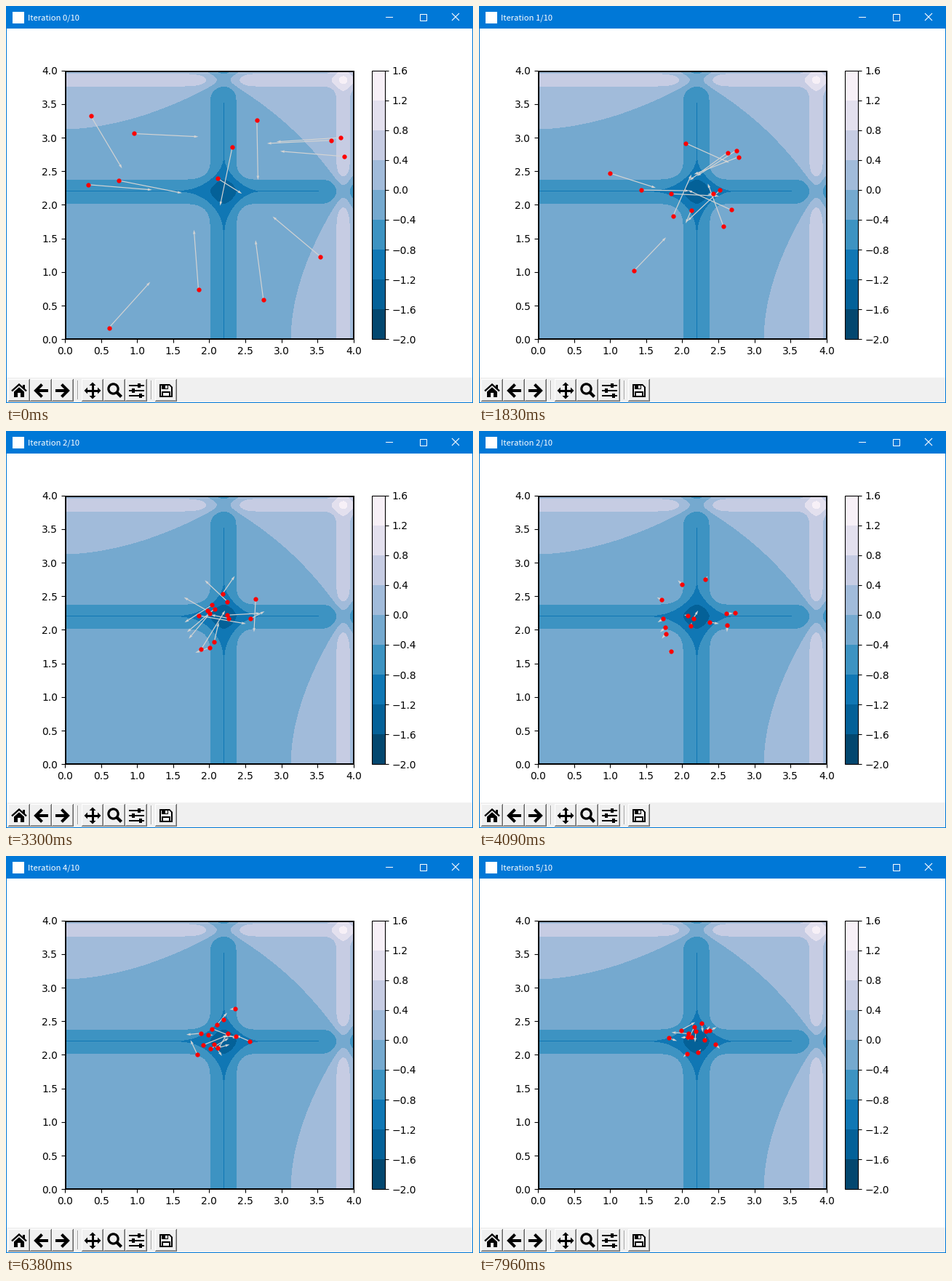
These frames come from a looping animation (642 by 546 pixels, 8 s). A matplotlib script:

```python
import numpy as np
import matplotlib.pyplot as plt
from matplotlib.animation import FuncAnimation
from matplotlib.patches import Circle, Polygon, Rectangle

W, H, DPI = 642, 546, 100
PT = 72 / DPI          # one pixel in points
FRAMES, INTERVAL = 200, 40
STEPS, PER_TURN = 112, 20   # swarm steps per loop and per iteration

fig = plt.figure(figsize=(W / DPI, H / DPI), dpi=DPI, facecolor="white")


def pixel_axes(x, y, w, h):
    return fig.add_axes([x / W, 1 - (y + h) / H, w / W, h / H])


# ---- objective function ----
def valley(v):
    return -np.sin(v) * np.sin(v**2 / np.pi) ** 20


grid = np.linspace(0, 4, 401)
ax = pixel_axes(81, 88.62, 396.8, 369.6)
levels = np.linspace(-2, 1.6, 10)
field = ax.contourf(grid, grid, valley(grid)[None, :] + valley(grid)[:, None],
                    levels=levels, cmap="PuBu_r")
ax.set_xticks(np.arange(0, 4.1, 0.5))
ax.set_yticks(np.arange(0, 4.1, 0.5))
ax.spines[:].set_visible(False)
fig.colorbar(field, cax=pixel_axes(502.6, 88.62, 18.48, 369.6), ticks=levels)

# ---- window ----
stage = fig.add_axes([0, 0, 1, 1], zorder=5)
stage.set_xlim(0, W)
stage.set_ylim(H, 0)
stage.axis("off")


def box(x, y, w, h, color):
    stage.add_patch(Rectangle((x, y), w, h, fc=color, lw=0))


def frame(x, y, w, h, width, color):
    stage.add_patch(Rectangle((x, y), w, h, fill=False, ec=color, lw=width * PT))


def shape(*points, color="black"):
    stage.add_patch(Polygon(points, fc=color, lw=0))


def stroke(points, width, color="black"):
    x, y = zip(*points)
    stage.plot(x, y, color=color, lw=width * PT, solid_capstyle="butt",
               solid_joinstyle="miter")


BLUE, FACE = "#0078d7", "#f0f0f0"
frame(82, 90, 396, 368, 2, "black")
box(0, 511, W, 35, FACE)
box(0, 0, W, 31, BLUE)
box(0, 0, 1, H, BLUE)
box(W - 1, 0, 1, H, BLUE)
box(0, H - 1, W, 1, BLUE)
box(9, 8, 16, 16, "white")

# minimise, maximise, close
left, gap = 522, 46
box(left, 15, 10, 1, "white")
frame(left + gap + 0.5, 10.5, 9, 9, 1, "white")
for y0, y1 in ((10, 20), (20, 10)):
    stroke([(left + 2 * gap - 1, y0), (left + 2 * gap + 9, y1)], 1.1, "white")
title = stage.text(30, 20, "", color="white", fontsize=11.2 * PT,
                   family="Noto Sans CJK JP", va="baseline")


# ---- toolbar ----
def button(x):
    box(x, 513, 30, 31, "#696969")
    box(x, 513, 29, 30, "white")
    box(x + 1, 514, 28, 29, "#a0a0a0")
    box(x + 1, 514, 27, 28, FACE)


for x in (3, 33, 63, 104, 134, 164, 205):
    button(x)
for x in (98, 199):
    box(x, 515, 1, 26, "#a0a0a0")
    box(x + 1, 515, 1, 26, "white")

# home
stroke([(8, 529.5), (18, 520.5), (28, 529.5)], 2.3)
box(23, 521, 2.6, 5, "black")
shape((11, 530.5), (18, 524.3), (25, 530.5), (25, 538), (20, 538),
      (20, 532), (16, 532), (16, 538), (11, 538))
# back and forward
for cx, d in ((48, 1), (78, -1)):
    stroke([(cx + 1.5 * d, 520.5), (cx - 7 * d, 529), (cx + 1.5 * d, 537.5)], 4)
    stroke([(cx - 6 * d, 529), (cx + 10 * d, 529)], 4)
# pan
stroke([(111, 529), (127, 529)], 3)
stroke([(119, 521), (119, 537)], 3)
for dx, dy in ((1, 0), (-1, 0), (0, 1), (0, -1)):
    bx, by = 119 + 7 * dx, 529 + 7 * dy
    shape((bx + 4.5 * dx, by + 4.5 * dy), (bx + 4.5 * dy, by + 4.5 * dx),
          (bx - 4.5 * dy, by - 4.5 * dx))
# zoom
stage.add_patch(Circle((147.5, 526.5), 6.6, fill=False, ec="black", lw=3.2 * PT))
stroke([(152, 531), (158.5, 537.5)], 4.2)
# sliders
for y, knob in ((522, 181), (529, 173), (536, 183)):
    box(169, y - 1, 21, 2, "black")
    box(knob, y - 3, 4, 6, "black")
# save
shape((211, 520), (225, 520), (229, 524), (229, 538), (211, 538))
shape((213, 522), (224.5, 522), (227, 524.5), (227, 536), (213, 536), color=FACE)
box(214, 520, 9, 7, "black")
box(219, 522, 2.5, 4, FACE)
box(214, 530, 12, 7, "black")
box(216, 532, 8, 4, FACE)

# ---- particle swarm ----
BEST = np.array([2.15, 2.25])
TOP_SPEED, INERTIA = 0.89, 0.6

# x, y and first heading in degrees
SEEDS = np.array([
    (0.36, 3.32, -61), (0.96, 3.06, -3), (0.32, 2.30, -5), (0.75, 2.36, -12),
    (0.61, 0.17, 50), (1.85, 0.74, 94), (2.75, 0.59, 97), (3.54, 1.23, 138),
    (3.87, 2.72, 175), (3.69, 2.96, 183), (3.82, 3.00, 184), (2.66, 3.26, -89),
    (2.32, 2.86, -101), (2.12, 2.39, -34)])


def limit(v):
    speed = np.linalg.norm(v, axis=1, keepdims=True)
    return v * np.minimum(1, TOP_SPEED / speed)


def fly(turns):
    rng = np.random.default_rng(4)
    pos, angle = SEEDS[:, :2], np.radians(SEEDS[:, 2])
    reach = 2.8 * np.linalg.norm(BEST - pos, axis=1)
    vel = limit(reach[:, None] * np.column_stack([np.cos(angle), np.sin(angle)]))
    stops = [pos]
    for _ in range(turns):
        pos = pos + vel
        stops.append(pos)
        pull = rng.uniform(0.5, 1.5, pos.shape) * (BEST - pos)
        vel = limit(INERTIA * vel + pull)
    return stops


stops = fly(STEPS // PER_TURN + 1)
arrows = ax.quiver(*stops[0].T, *(stops[1] - stops[0]).T, color="lightgray",
                   angles="xy", scale_units="xy", scale=1, units="dots",
                   width=1.2, zorder=3)
dots, = ax.plot([], [], "ro", ms=3, mew=1.5, zorder=4)
ax.set_xlim(0, 4)
ax.set_ylim(0, 4)


def update(i):
    turn, part = divmod(i * STEPS // FRAMES, PER_TURN)
    goal = stops[turn + 1]
    here = stops[turn] + (goal - stops[turn]) * part / PER_TURN
    arrows.set_offsets(here)
    arrows.set_UVC(*(goal - here).T)
    dots.set_data(*here.T)
    title.set_text(f"Iteration {turn}/10")
    return arrows, dots, title


anim = FuncAnimation(fig, update, frames=FRAMES, interval=INTERVAL,
                     init_func=lambda: update(0), repeat=True, repeat_delay=0)
plt.show()
```
